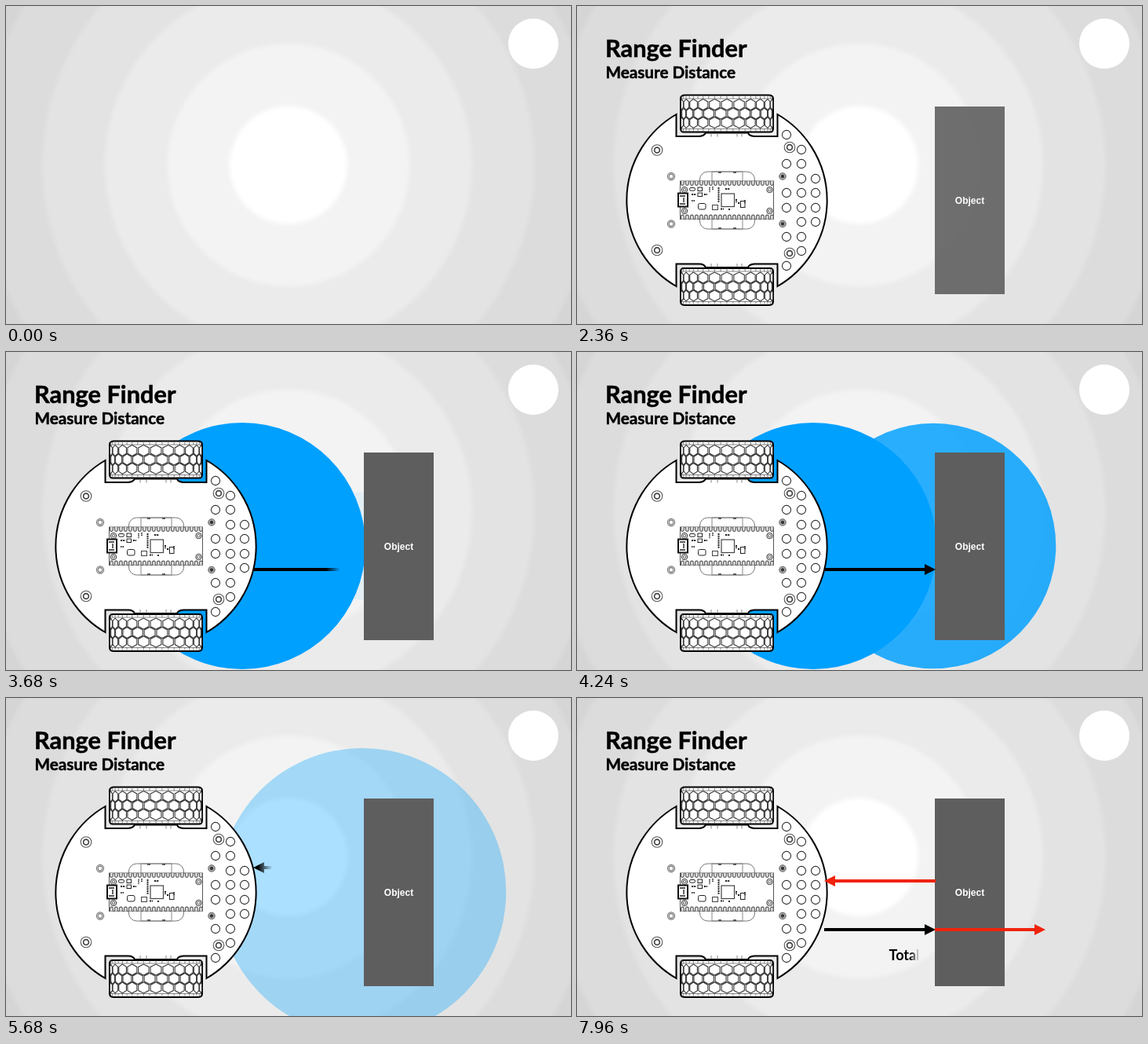
Animation of 720 by 405 pixels, one loop 8000 ms. Source, as an HTML page:

```html
<!DOCTYPE html>
<html lang="en">
<head>
<meta charset="utf-8">
<title>Range Finder</title>
<style>
html, body { margin: 0; width: 100%; height: 100%; overflow: hidden; background: #dcdcdc; }
svg { display: block; width: 100vw; height: 100vh; }
text { font-family: Lato, "Open Sans", sans-serif; font-weight: 700; }
#title { stroke: #000; stroke-width: .5; }
.label { font-family: "Liberation Sans", Arial, sans-serif; fill: #fff; }
</style>
</head>
<body>
<svg id="stage" viewBox="0 0 720 405">
  <defs id="defs">
    <radialGradient id="bands" gradientUnits="userSpaceOnUse" cx="360" cy="202.5" r="420"></radialGradient>
    <radialGradient id="irisFill" gradientUnits="userSpaceOnUse" cx="191" cy="246.500" r="1">
      <stop offset=".65" stop-color="#fff"/><stop offset="1" stop-color="#000"/>
    </radialGradient>
    <mask id="iris" maskUnits="userSpaceOnUse" x="0" y="0" width="720" height="405">
      <rect width="720" height="405" fill="url(#irisFill)"/>
    </mask>
  </defs>

  <rect width="720" height="405" fill="url(#bands)"/>
  <circle id="waveOut" cx="301" cy="247" fill="#00a0ff"/>
  <circle id="waveBack" cx="454" cy="247" fill="#00a0ff"/>
  <circle cx="672" cy="48" r="32" fill="#fff"/>

  <g id="title">
    <text x="36" y="65" font-size="30.800">Range Finder</text>
    <text x="36.500" y="92" font-size="20.700">Measure Distance</text>
  </g>

  <g id="robot" fill="none" stroke="#333">
    <path fill="#fff" stroke="#000" stroke-width="2" d="M255.500 138A126.500 126.500 0 0 1 255.500 357V328.500H226Q219 329 218 333H164Q162 328.500 156 328.500H126.500V357A126.500 126.500 0 0 1 126.500 138V166H156Q162 165.500 164 161.500H218Q219 165.500 226 166H255.500Z"/>
    <g id="holes" stroke-width="1.100"></g>
    <g id="board"></g>
    <g id="wheel"></g>
    <use href="#wheel" transform="matrix(1 0 0 -1 0 494.500)"/>
  </g>

  <g id="object">
    <rect x="456" y="128" width="89" height="239" fill="#5e5e5e"/>
    <text class="label" x="500.500" y="252" font-size="12" text-anchor="middle">Object</text>
  </g>
  <g id="arrows"></g>
  <text id="total" x="397.500" y="333.500" font-size="18">Total</text>
</svg>

<script>
const NS = 'http://www.w3.org/2000/svg';
const $ = id => document.getElementById(id);
const LOOP = 8000;

function add(parent, tag, attrs) {
  const el = document.createElementNS(NS, tag);
  for (const k in attrs) el.setAttribute(k, attrs[k]);
  parent.appendChild(el);
  return el;
}

function drawBackground() {
  const greys = ['#fff', '#f3f3f3', '#ebebeb', '#e3e3e3', '#dcdcdc', '#d5d5d5'];
  for (let i = 0; i < 5; i++) {
    const edge = 75 + 79.5 * i;
    add($('bands'), 'stop', { offset: (edge - 4) / 420, 'stop-color': greys[i] });
    add($('bands'), 'stop', { offset: (edge + 4) / 420, 'stop-color': greys[i + 1] });
  }
}

function drawWheel() {
  const g = $('wheel');
  // The tyre is a cylinder seen from above, so cells narrow towards both ends.
  const px = u => (191 + 59 * Math.sin(u)).toFixed(1);
  add(g, 'path', { fill: '#fff', stroke: '#000', 'stroke-width': 2,
    d: 'M132 118Q132 113.500 138 113.500H244Q250 113.500 250 118V156Q250 160.500 246 160.500H136Q132 160.500 132 156Z' });
  let cells = '';
  for (let row = 0; row < 3; row++) {
    const y = 125.5 + 11.5 * row;
    for (let k = -5; k <= 5; k++) {
      const u = (k + (row % 2) / 2) * 0.27;
      if (Math.abs(u) > 1.4) continue;
      const a = px(u - 0.118), b = px(u), c = px(u + 0.118);
      cells += `M${b} ${y - 7}L${c} ${y - 3.6}V${y + 3.6}L${b} ${y + 7}L${a} ${y + 3.6}V${y - 3.6}Z`;
    }
  }
  let ticks = 'M133 118H249M133 156.500H249';
  for (let u = -1.35; u <= 1.36; u += 0.135) ticks += `M${px(u)} 115V118M${px(u)} 156.500V160`;
  add(g, 'path', { d: cells, stroke: '#3c3c3c', 'stroke-width': 1.1 });
  add(g, 'path', { d: ticks, stroke: '#666', 'stroke-width': 0.8 });
  add(g, 'path', { d: 'M171 162V166.500M210 162V166.500M179 162V166.500M204 162V166.500', stroke: '#777', 'stroke-width': 0.9 });
}

function drawHoles() {
  const g = $('holes');
  const ring = (cx, cy, r, extra) => add(g, 'circle', { cx, cy, r, ...extra });
  const columns = {
    267: [164, 201, 238, 257, 294, 331],
    286: [183, 201, 220, 238, 257, 275, 294, 312],
    304: [220, 238, 257, 275]
  };
  for (const x in columns) columns[x].forEach(y => ring(x, y, 5.6));
  [[102, 183.5], [102, 311], [271, 180], [271, 315]].forEach(([x, y]) => {
    ring(x, y, 6.8, { stroke: '#555' });
    ring(x, y, 3.4, { stroke: '#444', 'stroke-width': 1.7 });
  });
  [217, 277.5].forEach(y => {
    ring(120, y, 4.6, { stroke: '#777' });
    ring(120, y, 2.9, { stroke: '#777' });
    ring(262, y, 4.2, { fill: '#aaa', stroke: '#666' });
    ring(262, y, 1.6, { fill: '#333' });
  });
}

function drawBoard() {
  const g = $('board');
  const box = (x, y, width, height, extra) =>
    add(g, 'rect', { x, y, width, height, 'stroke-width': 1, ...extra });
  box(156.5, 211, 70, 73, { rx: 10, stroke: '#777' });
  box(172, 211, 39, 73, { stroke: '#888' });
  add(g, 'path', { d: 'M180 212H203M180 283H203', stroke: '#333', 'stroke-width': 1.6, 'stroke-dasharray': '4 15' });
  box(131.5, 223, 119, 48.5, { fill: '#fff', stroke: '#555' });

  let pins = '';
  for (let i = 0; i < 20; i++) {
    const x = 132.5 + 6 * i;
    pins += `M${x} 223v3.500a1.900 1.900 0 0 0 3.800 0v-3.500M${x} 271.500v-3.500a1.900 1.900 0 0 1 3.800 0v3.500`;
  }
  add(g, 'path', { d: pins, stroke: '#555', 'stroke-width': 1.1, fill: '#ddd' });

  box(129, 238.5, 12, 17, { fill: '#fff', stroke: '#111', 'stroke-width': 2 });
  add(g, 'path', { d: 'M131 242H138M131 252H138M136 244V250', stroke: '#222', 'stroke-width': 1.4 });
  box(184, 239, 16.5, 16.5, { stroke: '#444', 'stroke-width': 1.2 });
  box(154.5, 251.5, 9.5, 7.5, { rx: 2, stroke: '#222' });
  box(172.5, 253.5, 7, 6, { stroke: '#444' });
  box(208.5, 248.5, 5.5, 8, { stroke: '#222' });
  box(143.5, 231.5, 7, 3.6, { rx: 1.5, stroke: '#222' });
  [[154, 231], [154, 238]].forEach(([x, y]) => box(x, y, 5.5, 4.5, { stroke: '#222' }));
  [[137, 234], [137, 261], [245.5, 234], [245.5, 261]].forEach(([cx, cy]) => {
    add(g, 'circle', { cx, cy, r: 3.7, fill: '#fff', stroke: '#333' });
    add(g, 'circle', { cx, cy, r: 1.8, stroke: '#555' });
  });
  add(g, 'path', { d: 'M180.500 231V250M189 233H195M203 246V250M205 251H208M183 258.500H187M194 258V260M146 240H152M162 240H166',
    stroke: '#222', 'stroke-width': 2, 'stroke-dasharray': '2 .8' });
  add(g, 'path', { d: 'M169 231V237M173 230V234M146 248H150M214 247V251',
    stroke: '#333', 'stroke-width': 1.8, 'stroke-dasharray': '1.500 1' });
}

function makeArrow(from, to, y, color) {
  const d = Math.sign(to - from), neck = to - 14 * d;
  const el = add($('arrows'), 'path', { fill: color,
    d: `M${from} ${y - 2}H${neck}V${y - 7}L${to} ${y}L${neck} ${y + 7}V${y + 2}H${from}Z` });
  return makeWipe(el, from, to, 18);
}

function makeWipe(el, from, to, soft) {
  const id = 'wipe' + $('defs').children.length;
  const grad = add($('defs'), 'linearGradient', { id: id + 'g', gradientUnits: 'userSpaceOnUse', y1: 0, y2: 0 });
  const stops = [0, 1].map(offset => add(grad, 'stop', { offset }));
  const mask = add($('defs'), 'mask', { id, maskUnits: 'userSpaceOnUse', x: 0, y: 0, width: 720, height: 405 });
  add(mask, 'rect', { width: 720, height: 405, fill: `url(#${id}g)` });
  return { el, from, to, soft, id, grad, stops };
}

const progress = (t, start, length) => Math.min(1, Math.max(0, (t - start) / length));

function show(el, on) { el.style.visibility = on ? 'visible' : 'hidden'; }

function wipe(w, p, out = false) {
  show(w.el, out ? p < 1 : p > 0);
  if (p <= 0 || p >= 1) { w.el.removeAttribute('mask'); return; }
  const half = Math.sign(w.to - w.from) * w.soft / 2;
  const edge = w.from + (w.to - w.from) * p;
  w.grad.setAttribute('x1', edge - half);
  w.grad.setAttribute('x2', edge + half);
  w.stops[0].setAttribute('stop-color', out ? '#000' : '#fff');
  w.stops[1].setAttribute('stop-color', out ? '#fff' : '#000');
  w.el.setAttribute('mask', `url(#${w.id})`);
}

// Grows from nothing while fading in, later swells to double size while fading out.
function wave(el, t, start, end) {
  const a = progress(t, start, 820), b = progress(t, end, 820);
  const scale = 1 - (1 - a) ** 2.33 + b ** 2.33;
  el.setAttribute('r', 157 * scale);
  el.setAttribute('opacity', a ** 1.77 * (1 - b) ** 1.77);
}

drawBackground();
drawHoles();
drawBoard();
drawWheel();

const title = makeWipe($('title'), 20, 235, 60);
const total = makeWipe($('total'), 398, 436, 12);
const ping = makeArrow(315, 457, 277, '#000');
const echo = makeArrow(457, 315, 216, '#000');
const there = makeArrow(315, 457, 295, '#000');
const back = makeArrow(457, 315, 233, '#f0230c');
const copy = makeArrow(456, 597, 295, '#f0230c');
const WIPE = 420;

function draw(t) {
  wipe(title, progress(t, 500, 950));

  show($('robot'), t > 1535);
  if (t < 1760) {
    $('irisFill').setAttribute('r', Math.max(1, 30 + (t - 1560) * 1.2));
    $('robot').setAttribute('mask', 'url(#iris)');
  } else $('robot').removeAttribute('mask');

  $('object').setAttribute('opacity', progress(t, 2045, 355));

  wave($('waveOut'), t, 2540, 4340);
  wave($('waveBack'), t, 3502, 5300);

  if (t < 4340) wipe(ping, progress(t, 3380, WIPE));
  else wipe(ping, progress(t, 4340, WIPE), true);
  if (t < 5306) wipe(echo, progress(t, 4870, WIPE));
  else wipe(echo, progress(t, 5306, WIPE), true);

  wipe(there, progress(t, 6740, WIPE));
  wipe(back, progress(t, 7180, WIPE));
  wipe(copy, progress(t, 7180, WIPE));
  wipe(total, progress(t, 7600, WIPE));
}

function tick() {
  draw(performance.now() % LOOP);
  requestAnimationFrame(tick);
}
tick();
</script>
</body>
</html>
```
